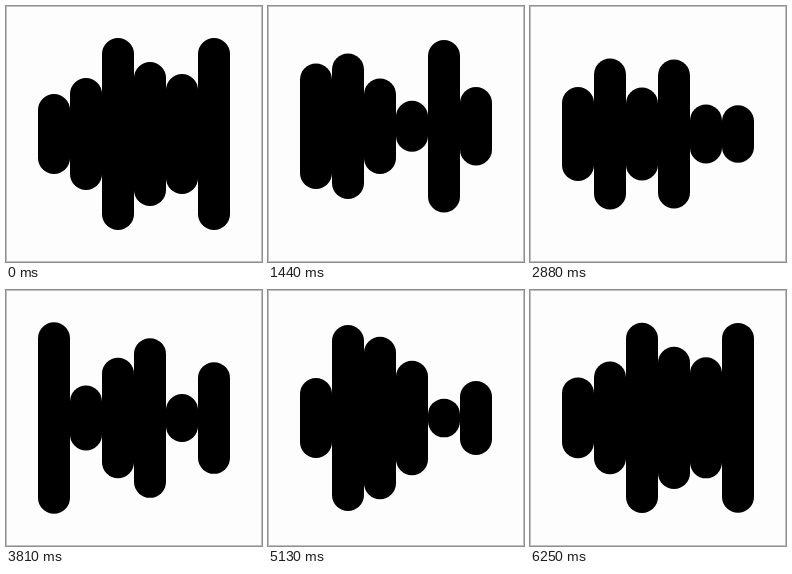
Write an HTML page with a canvas that moves like this. It is 256x256 px and loops after 6.31 s.

```html
<!DOCTYPE html>
<html lang="en">
<head>
<meta charset="utf-8">
<title>Bars</title>
<style>
  html, body { margin: 0; width: 100%; height: 100%; overflow: hidden; background: #fdfdfd; }
  canvas { display: block; width: 100vw; height: 100vh; }
</style>
</head>
<body>
<canvas></canvas>
<script>
const SIZE = 256, BAR = 32, LEFT = 32;
const LOOP = 6310, STEP = 62.5, MOVE = 800;

// Half heights of the six bars, and the line they are centred on
const poses = [
  { mid: 128, half: [40, 56, 96, 72, 60, 96] },
  { mid: 120, half: [64, 72, 48, 24, 88, 40] },
  { mid: 128, half: [24, 96, 40, 72, 32, 16] },
  { mid: 128, half: [96, 32, 60, 80, 24, 56] },
  { mid: 128, half: [40, 96, 80, 56, 16, 32] }
];
const starts = [256, 1337, 2561, 3766, 4970, 6172];

const canvas = document.querySelector('canvas');
const ctx = canvas.getContext('2d');

const mix = (a, b, p) => a + (b - a) * p;

// cubic-bezier(.42, 0, .58, 1)
function easeInOut(x) {
  if (x <= 0) return 0;
  if (x >= 1) return 1;
  let lo = 0, hi = 1, s;
  for (let i = 0; i < 24; i++) {
    s = (lo + hi) / 2;
    const bx = 3 * s * (1 - s) * (0.42 * (1 - s) + 0.58 * s) + s * s * s;
    if (bx < x) lo = s; else hi = s;
  }
  return s * s * (3 - 2 * s);
}

function drawBar(x, mid, half) {
  const r = BAR / 2, cx = x + r;
  const top = mid - half + r, bottom = mid + half - r;
  ctx.beginPath();
  ctx.arc(cx, top, r, Math.PI, 0);
  ctx.arc(cx, bottom, r, 0, Math.PI);
  ctx.fill();
}

function draw(t) {
  let k = starts.length - 1;
  while (k > 0 && t < starts[k]) k--;
  const from = poses[k % poses.length];
  const to = poses[(k + 1) % poses.length];
  const p = easeInOut((t - starts[k]) / MOVE);

  ctx.fillStyle = '#fdfdfd';
  ctx.fillRect(0, 0, SIZE, SIZE);
  ctx.strokeStyle = '#c0c0c0';
  ctx.lineWidth = 1;
  ctx.strokeRect(0.5, 0.5, SIZE - 1, SIZE - 1);

  ctx.fillStyle = '#000';
  const mid = mix(from.mid, to.mid, p);
  from.half.forEach((h, i) => drawBar(LEFT + i * BAR, mid, mix(h, to.half[i], p)));
}

function resize() {
  const dpr = window.devicePixelRatio || 1;
  canvas.width = Math.round(innerWidth * dpr);
  canvas.height = Math.round(innerHeight * dpr);
  ctx.setTransform(canvas.width / SIZE, 0, 0, canvas.height / SIZE, 0, 0);
}

const begin = performance.now();

function tick() {
  const t = (performance.now() - begin) % LOOP;
  // Sixteen pictures a second, changing on rounded 10 ms marks
  draw(Math.floor((t + 3) / STEP) * STEP);
  requestAnimationFrame(tick);
}

addEventListener('resize', resize);
resize();
tick();
</script>
</body>
</html>
```
